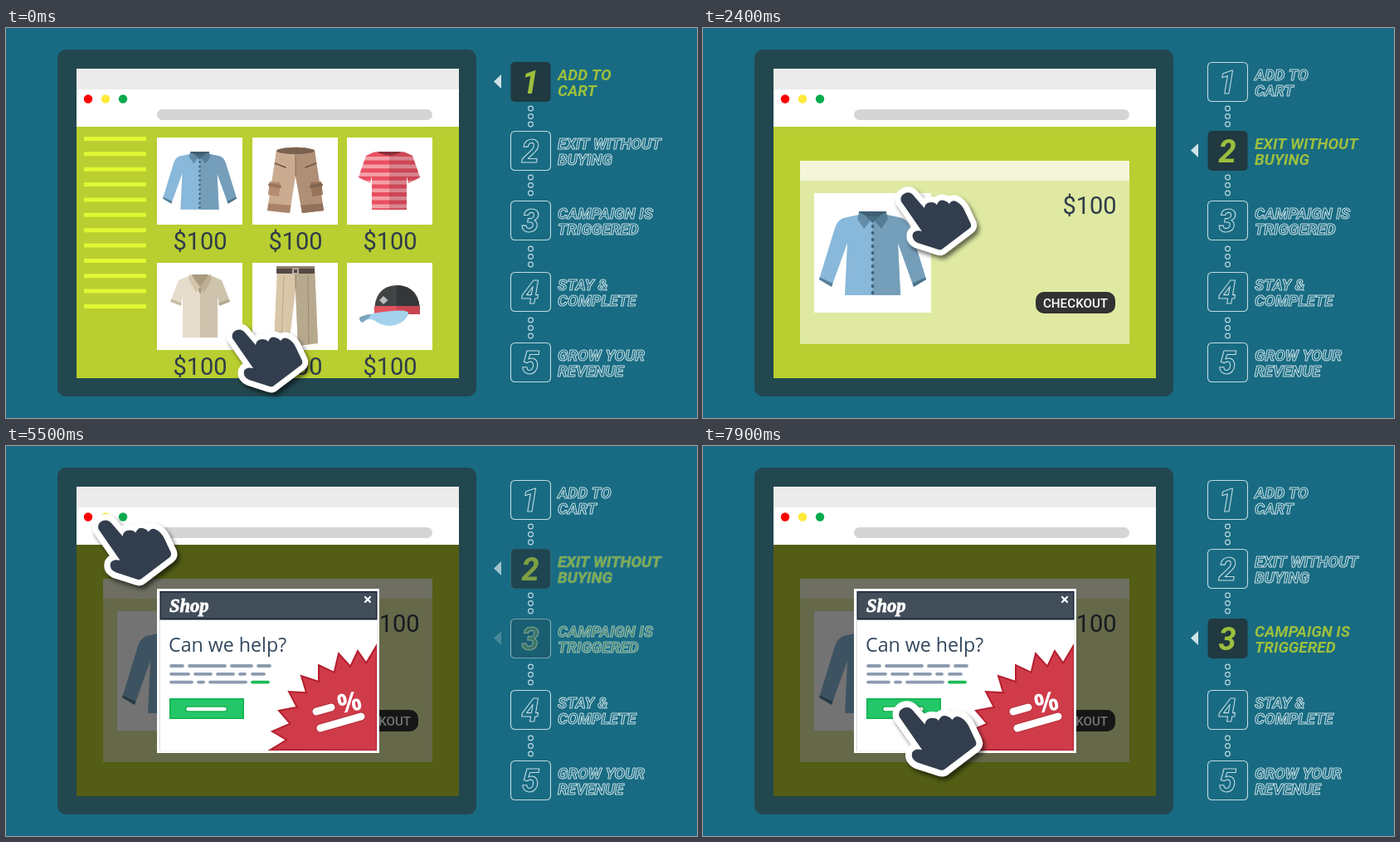
Recreate the animation shown at these times as an HTML page with a canvas. Size 833 by 470 pixels, loop 8 s.

```html
<!DOCTYPE html>
<html lang="en">
<head>
<meta charset="utf-8">
<title>Cart recovery</title>
<style>
html, body { margin: 0; overflow: hidden; background: #186b82; }
canvas { display: block; }
</style>
</head>
<body>
<canvas id="stage" width="833" height="470"></canvas>
<script>
const W = 833, H = 470, LOOP = 8000, FRAME = 100;
const stage = document.getElementById('stage').getContext('2d');
let c = stage;

const clamp = v => Math.max(0, Math.min(1, v));
const ramp = (t, from, to) => clamp((t - from) / (to - from));
const smooth = u => u * u * (3 - 2 * u);

function rect(x, y, w, h, color, r = 0) {
  c.fillStyle = color;
  c.beginPath();
  c.roundRect(x, y, w, h, r);
  c.fill();
}
function dot(x, y, r, color) {
  c.fillStyle = color;
  c.beginPath();
  c.arc(x, y, r, 0, 7);
  c.fill();
}
function shape(d, color) {
  c.fillStyle = color;
  c.fill(new Path2D(d));
}
function line(x1, y1, x2, y2, width, color, cap = 'round') {
  c.strokeStyle = color;
  c.lineWidth = width;
  c.lineCap = cap;
  c.beginPath();
  c.moveTo(x1, y1);
  c.lineTo(x2, y2);
  c.stroke();
}
function text(s, x, y, font, color, align = 'left') {
  c.font = font;
  c.textAlign = align;
  c.fillStyle = color;
  c.fillText(s, x, y);
}
// Flat garment whose right side is shaded; extra details stay inside its outline.
function garment(d, light, dark, mid, details) {
  const path = new Path2D(d);
  c.save();
  c.clip(path);
  rect(0, 0, W, H, light);
  rect(mid, 0, W, H, dark);
  if (details) details();
  c.restore();
}

function layer(draw) {
  const canvas = document.createElement('canvas');
  canvas.width = W;
  canvas.height = H;
  c = canvas.getContext('2d');
  draw();
  c = stage;
  return canvas;
}

const PRICE = '400 29px Roboto, sans-serif';
const INK = '#2f3c4a', LIME = '#b9ce30';

function shirt(x, y, scale) {
  c.save();
  c.translate(x, y);
  c.scale(scale, scale);
  garment('M48 4L29 8Q22 11 19 20L0 82L15 91L34 38L31 101H98L95 38L114 91L129 82L110 20Q107 11 100 8L81 4Z',
    '#88b8da', '#759eba', 64.5, () => {
      shape('M0 79L17 87L13 95L-5 88Z', '#578197');
      shape('M129 79L112 87L116 95L134 88Z', '#4d748b');
    });
  rect(48, 0, 33, 8, '#3f5f73');
  shape('M48 1L64 9L54 21L46 9Z', '#638da6');
  shape('M81 1L65 9L75 21L83 9Z', '#557e96');
  shape('M56 6H73L64.5 14Z', '#4a6e83');
  for (let i = 0; i < 11; i++) dot(64.5, 18 + i * 8, 1.9, '#3f6077');
  c.restore();
}

function shorts() {
  garment('M326 147Q349 140 372 147L383 220L357 223L349 178L342 223L315 220Z', '#cbab90', '#b08f77', 349, () => {
    shape('M310 211L350 214V225H310Z', '#a98369');
    shape('M390 211L349 214V225H390Z', '#92705b');
    line(324, 163, 337, 168, 1.5, '#6f5543');
    line(374, 163, 361, 168, 1.5, '#6f5543');
  });
  c.fillStyle = '#7a6250';
  c.beginPath();
  c.ellipse(349, 148, 23, 4, 0, 0, 7);
  c.fill();
  line(349, 152, 349, 178, 1, '#8b6d58');
  shape('M318 185L331 186L329 203L316 201Z', '#b48c6f');
  shape('M380 185L367 186L369 203L382 201Z', '#967359');
  line(318, 189, 330, 191, 4, '#9b765d');
  line(380, 189, 368, 191, 4, '#82634f');
}

function tee() {
  garment('M445 149H479L490 154L499 180L485 187L483 178V219H441V178L439 187L425 180L434 154Z',
    '#f4a0a8', '#d8848e', 462, () => {
      for (let y = 150; y < 220; y += 9.6) {
        rect(420, y, 42, 5, '#e94f60');
        rect(462, y, 42, 5, '#cd4656');
      }
    });
  shape('M447 149H477Q462 158 447 149Z', '#8c2f3b');
}

function polo() {
  garment('M222 298H246L260 304L270 330L257 335L255 322V373H213V322L211 335L198 330L208 304Z',
    '#e6dccb', '#cec3ad', 234, () => {
      line(198, 328, 211, 333, 3, '#c8baa0');
      line(270, 328, 257, 333, 3, '#b3a78f');
    });
  shape('M224 297H244L234 321Z', '#a99a80');
  shape('M222 296L234 312L229 319L220 302Z', '#d3c5ac');
  shape('M246 296L234 312L239 319L248 302Z', '#beb097');
}

function trousers() {
  garment('M327 287H372L376 380L352 383L349 316L341 383L323 380Z', '#d9c6a9', '#b7a98e', 349, () => {
    line(335, 300, 332, 380, 1, '#b9a588');
    line(364, 300, 365, 380, 1, '#988a71');
  });
  rect(326, 287, 46, 3, '#8d7e69');
  rect(326, 290, 46, 6, '#544944', 1);
  rect(345, 289.5, 8, 7, '#b9b1a5', 1);
  rect(347, 291, 4, 4, '#544944');
  line(349, 297, 349, 314, 1, '#92836b');
}

function cap() {
  garment('M444 345Q443 311 471 310Q500 311 499 345Z', '#414344', '#343638', 471, () => {
    rect(440, 335, 31, 10, '#e2525f');
    rect(471, 335, 30, 10, '#c84652');
  });
  shape('M455 323L460.5 328L455 333L450 328Z', '#b9bbbd');
  shape('M426 349Q445 342 465 341Q487 339 485 345Q479 358 462 359Q451 358 445 353Q437 348 430 355Q426 354 426 349Z', '#a4d2ed');
  shape('M426 349Q433 345 440 345L437 350Q433 351 430 355Q426 354 426 349Z', '#7ba5be');
}

const shop = layer(() => {
  rect(85, 119, 461, 303, LIME);
  c.beginPath();
  c.rect(85, 119, 461, 303);
  c.clip();
  for (let i = 0; i < 12; i++) rect(94, 131 + i * 18.36, 75, 5, '#e0f734');
  for (const y of [132, 283])
    for (const x of [182, 297, 411]) {
      rect(x, y, 103, 105, '#fff');
      text('$100', x + 52, y + 135, PRICE, INK, 'center');
    }
  shirt(189, 149, 0.69);
  shorts();
  tee();
  polo();
  trousers();
  cap();
});

const cart = layer(() => {
  rect(85, 119, 461, 303, LIME);
  rect(117, 160, 397, 221, '#dfe9a2');
  rect(117, 160, 397, 24, '#f3f6d9');
  rect(134, 199, 141, 144, '#fff');
  shirt(140, 221, 1);
  text('$100', 466, 224, PRICE, INK, 'center');
  rect(401, 318, 96, 26, '#333132', 10);
  text('CHECKOUT', 449, 336.5, '500 15.2px Roboto, sans-serif', '#fff', 'center');
});

function starburst() {
  const tips = [[319, 366], [321, 344], [329, 319], [341, 296], [356, 277], [377, 264], [401, 250], [424, 247], [447, 240]];
  const cx = 428, cy = 350;
  c.save();
  c.beginPath();
  c.rect(186, 209, 261, 158);
  c.clip();
  c.beginPath();
  c.moveTo(447, 367);
  tips.forEach(([x, y], i) => {
    c.lineTo(x, y);
    const next = tips[i + 1];
    if (!next) return;
    const mx = (x + next[0]) / 2, my = (y + next[1]) / 2;
    c.lineTo(mx + (cx - mx) * 0.17, my + (cy - my) * 0.17);
  });
  c.closePath();
  c.fillStyle = '#cf3b49';
  c.fill();
  c.strokeStyle = '#b41f2e';
  c.lineWidth = 2;
  c.stroke();
  c.restore();
  for (const [width, color] of [[11, '#b72c3a'], [9, '#fff']]) {
    line(374, 320, 392, 315, width, color);
    line(379, 340, 428, 326, width, color);
  }
  c.save();
  c.translate(414, 309);
  c.rotate(-0.2);
  text('%', 0, 11, 'bold 32px "Open Sans", sans-serif', '#fff', 'center');
  c.restore();
}

const popup = layer(() => {
  rect(85, 119, 461, 303, 'rgba(0,0,0,.55)');
  rect(182, 172, 268, 198, '#fff');
  rect(184.5, 174.5, 263, 193, '#dfe3e6');
  rect(186, 209, 261, 158, '#fff');
  rect(185.5, 175, 262, 34.5, '#1b2739');
  rect(187, 176.5, 259, 31, '#424d5a');
  text('Shop', 197, 200, 'italic bold 22.5px "Liberation Serif", serif', '#fff');
  c.strokeStyle = '#fff';
  c.lineWidth = 0.8;
  c.strokeText('Shop', 197, 200);
  line(433, 182, 439, 188, 2.2, '#fff');
  line(439, 182, 433, 188, 2.2, '#fff');
  text('Can we help?', 196, 248, '23.2px "Open Sans", sans-serif', '#34495e');
  const rows = [[197, 215, 219, 266, 270, 298, 302, 320], [197, 222, 226, 249, 253, 276, 280, 290, 295, 313], [197, 226, 230, 240, 244, 291, 295, 318]];
  rows.forEach((row, r) => {
    for (let i = 0; i < row.length; i += 2)
      line(row[i] + 2, 265 + r * 9.8, row[i + 1] - 2, 265 + r * 9.8, 3.8, r === 2 && i === 6 ? '#1cba57' : '#8c9bb0');
  });
  rect(197, 304, 90, 25, '#10b04d');
  rect(198.5, 305.5, 87, 22, '#23c768');
  line(219.5, 317, 263.5, 317, 7, '#12a94b');
  line(219.5, 317, 263.5, 317, 4.5, '#fff');
  starburst();
});

const backdrop = layer(() => {
  rect(0, 0, W, H, '#186b82');
  rect(62, 26, 505, 418, '#22474f', 10);
  rect(85, 49, 461, 25, '#ebebeb');
  rect(85, 74, 461, 45, '#fff');
  ['#fd0000', '#ffe93a', '#08ab4e'].forEach((color, i) => dot(99 + i * 21, 85.5, 5.2, color));
  rect(182, 98, 332, 13, '#d5d5d5', 6.5);
  for (const y of [97, 180, 266, 352])
    for (let i = 0; i < 3; i++) {
      c.strokeStyle = '#c3dce2';
      c.lineWidth = 1.1;
      c.beginPath();
      c.arc(632.5, y + i * 9.5, 2.9, 0, 7);
      c.stroke();
    }
});

const steps = [
  [41, 'ADD TO', 'CART'],
  [124, 'EXIT WITHOUT', 'BUYING'],
  [208, 'CAMPAIGN IS', 'TRIGGERED'],
  [294, 'STAY &', 'COMPLETE'],
  [379, 'GROW YOUR', 'REVENUE']
];

function stepLabels(paint, number, y, first, second) {
  c.textAlign = 'center';
  c.font = 'italic bold 38px Roboto, sans-serif';
  c[paint](number, 632, y + 38);
  c.textAlign = 'left';
  c.font = 'italic bold 18.9px Roboto, sans-serif';
  c[paint](first, 665, y + 21.5);
  c[paint](second, 665, y + 40.5);
}

function drawStep([y, first, second], index, active) {
  c.lineJoin = 'round';
  c.strokeStyle = '#c3dce2';
  c.lineWidth = 1.1;
  c.globalAlpha = 1 - active;
  c.beginPath();
  c.roundRect(608.5, y + 0.5, 48, 47, 5);
  c.stroke();
  stepLabels('strokeText', index + 1, y, first, second);
  c.globalAlpha = active;
  rect(608.5, y, 48, 48, '#213940', 5);
  c.fillStyle = '#9dbf3e';
  stepLabels('fillText', index + 1, y, first, second);
  shape(`M588 ${y + 23.5}L597 ${y + 15}V${y + 32}Z`, '#cfe2e6');
  c.globalAlpha = 1;
}

const hand = new Path2D('M273 374Q271 367 278 364Q284 362 288 367L301 382Q302 375 309 375Q314 375 316 378Q319 371 325 373Q329 374 331 377Q335 371 341 375Q346 378 349 384L357 401Q358 404 356 406L323 431Q321 433 318 432L293 424Q285 420 287 413Q290 408 298 410Z');

function drawHand(x, y, scale) {
  c.save();
  c.translate(316 + x, 398 + y);
  c.scale(scale, scale);
  c.translate(-316, -398);
  c.lineJoin = 'round';
  c.lineWidth = 14;
  c.strokeStyle = '#fff';
  c.shadowColor = 'rgba(0,0,0,.55)';
  c.shadowBlur = 5;
  c.shadowOffsetX = 3;
  c.shadowOffsetY = 4;
  c.stroke(hand);
  c.shadowColor = 'transparent';
  c.fillStyle = '#323e4d';
  c.fill(hand);
  c.restore();
}

// Each leg: start, end, easing, then two or four Bézier points.
const linear = u => u;
const legs = [
  [0, 1000, linear, [0, 0], [-18, -57], [-36, -114], [-40, -171]],
  [2300, 3200, smooth, [-40, -171], [19, -113], [20, -71], [-38, -89]],
  [3200, 4135, linear, [-38, -89], [-178.5, -276.5]],
  [5400, 6300, linear, [-178.5, -276.5], [-10, -242]],
  [6300, 7200, linear, [-10, -242], [60, -225], [125, -150], [125, -80]],
  [7200, 7900, linear, [125, -80], [10, -118], [-165, -112], [-32, -45]]
];

function handAt(t) {
  const [from, to, ease, ...p] = legs.filter(leg => leg[0] <= t).pop();
  const u = ease(ramp(t, from, to)), v = 1 - u;
  return [0, 1].map(k => p.length === 2
    ? v * p[0][k] + u * p[1][k]
    : v * v * v * p[0][k] + 3 * v * v * u * p[1][k] + 3 * v * u * u * p[2][k] + u * u * u * p[3][k]);
}

function pressAt(t) {
  return 1 + 0.08 * (ramp(t, 800, 1000) - ramp(t, 2300, 2400)
    + ramp(t, 4000, 4200) - ramp(t, 5400, 5600))
    + 0.1 * ramp(t, 7700, 7900);
}

function fade(canvas, alpha) {
  c.globalAlpha = alpha;
  c.drawImage(canvas, 0, 0);
  c.globalAlpha = 1;
}

function render(t) {
  const toCart = ramp(t, 1000, 1400), toCampaign = ramp(t, 5400, 5800);
  fade(backdrop, 1);
  fade(shop, 1);
  fade(cart, toCart);
  fade(popup, ramp(t, 4300, 4500));
  const active = [1 - toCart, toCart - toCampaign, toCampaign, 0, 0];
  steps.forEach((step, i) => drawStep(step, i, active[i]));
  drawHand(...handAt(t), pressAt(t));
}

const begin = performance.now();
function tick() {
  const t = (performance.now() - begin) % LOOP;
  render(Math.floor(t / FRAME) * FRAME);
  requestAnimationFrame(tick);
}
tick();
</script>
</body>
</html>
```
